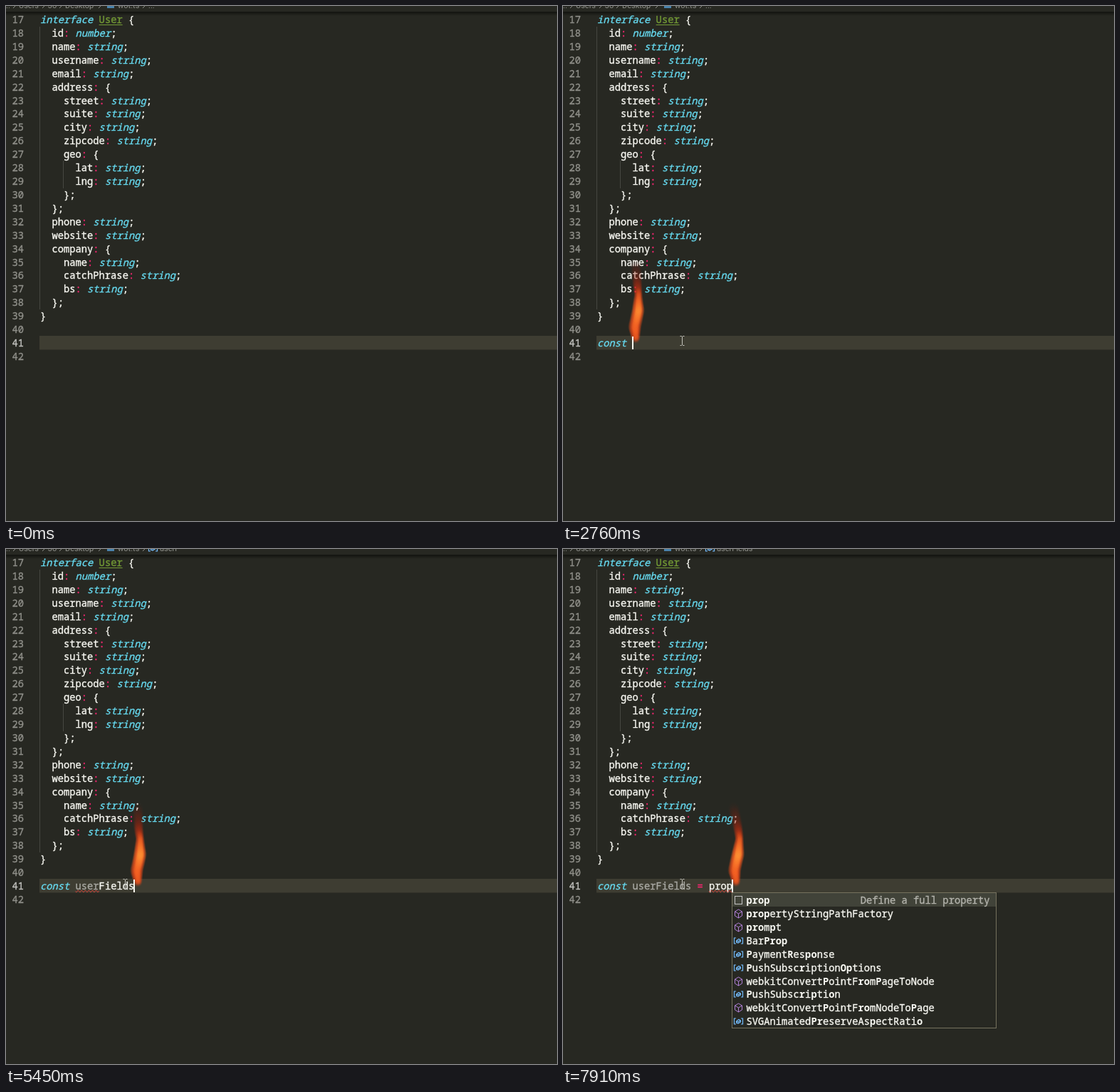
An HTML page with a canvas for the animation above (7.99 s loop, 774 by 723 pixels).

```html
<!DOCTYPE html>
<html lang="en">
<head>
<meta charset="utf-8">
<title>Typing with flames</title>
<style>
html, body { margin: 0; width: 100%; height: 100%; overflow: hidden; background: #272822; }
canvas { display: block; }
</style>
</head>
<body>
<canvas id="stage" width="774" height="723"></canvas>
<script>
const ctx = document.getElementById('stage').getContext('2d');
const LOOP = 7990, CW = 8.262, LH = 18.92, LEFT = 48, ROW = 473;
const MONO = '"Noto Sans Mono", "DejaVu Sans Mono", monospace';
const WHITE = '#f8f8f2', BLUE = '#66d9ef', PINK = '#f92672', DIM = '#a9a9a3';

const CODE = `interface User {
  id: number;
  name: string;
  username: string;
  email: string;
  address: {
    street: string;
    suite: string;
    city: string;
    zipcode: string;
    geo: {
      lat: string;
      lng: string;
    };
  };
  phone: string;
  website: string;
  company: {
    name: string;
    catchPhrase: string;
    bs: string;
  };
}`.split('\n');

const TYPED = 'const userFields = prop';
const KEYS = [1680, 1760, 1850, 1960, 2380, 2600, 3100, 3280, 3500, 3900, 4600, 4960,
  5060, 5130, 5190, 5260, 5880, 5940, 6000, 6830, 7060, 7220, 7500];
const BURN = 600;

// Breadcrumb symbol by time; empty means an ellipsis
const CRUMBS = [[0, ''], [3260, 'u'], [3460, 'us'], [3750, 'use'], [4300, 'user'],
  [5300, 'userF'], [5700, 'userFields'], [6300, ''], [7680, 'userFields']];

// First letter picks the icon, stars switch the matched letters on and off
const POPUPS = [
  { from: 1990, to: 2380, col: 4, scroll: true, items: ['v*cons*ole', 'k*cons*t', 'v*Cons*tantSourceNode',
    'v*Co*u*n*tQueuing*S*trategy', 'vms*Con*tent*S*cript', 'v*Co*mpo*s*itio*n*Event', 'v*C*l*os*eEve*n*t',
    'vHTMLForm*Con*trol*s*Collection', 'v*C*aretP*os*itio*n*', 'v*c*ust*o*mEleme*n*t*s*',
    'vDynamics*Co*mpre*s*sor*N*ode', 'v*C*ust*o*mEleme*n*tRegi*s*try'] },
  { from: 2420, to: 2600, col: 5, items: ['k*const*', 'v*Const*antSourceNode', 'v*Co*u*n*tQueuing*St*rategy',
    'vms*Con*tent*S*crip*t*', 'vHTMLForm*Con*trol*s*Collec*t*ion', 'v*C*ust*o*mEleme*n*tRegi*st*ry',
    'vOver*const*rainedError', 'vCustomElement*Const*ructor', 'vMediaStream*Const*raints', 'vAudio*Con*text*St*ate'] },
  { from: 4000, to: 4600, col: 10, items: ['a*user*name', 'a*User*'] },
  { from: 7540, to: LOOP, col: 23, note: 'Define a full property', items: ['s*prop*', 'm*prop*ertyStringPathFactory',
    'm*pro*m*p*t', 'vBar*Prop*', 'v*P*ayment*R*es*po*nse', 'v*P*ushSubsc*r*iption*Op*tions',
    'mwebkitConvert*P*ointF*ro*m*P*ageToNode', 'v*P*ushSubsc*r*i*p*ti*o*n',
    'mwebkitConvert*P*ointF*ro*mNodeTo*P*age', 'vSVGAnimated*Pr*eserveAs*p*ectRati*o*'] }
];

// Flame spine, bottom to top: height, sideways shift, radius, heat
const SPARK = [[1, 1, 3, .5], [5, 2, 5, .7], [9, 3, 6, .9], [13, 4, 6, 1], [17, 4, 5, .8], [20, 4, 3, .4]];
const RISING = [[11, 1, 5, .65], [30, 2, 9, .75], [60, 11, 7, .8], [84, 9, 4, .45], [100, 6, 7, .14], [117, 5, 8, .03]];
const FULL = [[5, 5, 6, .75], [22, 3, 9, .8], [44, 8, 9, 1], [66, 9, 6, .8], [86, 6, 7, .35], [110, 3, 8, .06]];

const mix = (a, b, k) => a + (b - a) * k;
const clamp = k => Math.max(0, Math.min(1, k));
const mixRow = (a, b, k) => a.map((v, i) => mix(v, b[i], k));
const textWidth = s => s.length * CW;

function rect(x, y, w, h, color) {
  ctx.fillStyle = color;
  ctx.fillRect(x, y, w, h);
}

// A hairline outline gives the regular weight a medium look
function put(s, x, y, color = WHITE, style = '') {
  ctx.font = `${style} ${CW / .6}px ${MONO}`;
  ctx.fillStyle = ctx.strokeStyle = color;
  ctx.lineWidth = .35;
  ctx.fillText(s, x, y + 5);
  if (style !== 'bold') ctx.strokeText(s, x, y + 5);
  return x + textWidth(s);
}

function stroke(color, width, ...lines) {
  ctx.strokeStyle = color;
  ctx.lineWidth = width;
  ctx.beginPath();
  for (const line of lines)
    line.forEach(([x, y], i) => i ? ctx.lineTo(x, y) : ctx.moveTo(x, y));
  ctx.stroke();
}

function squiggle(x, w) {
  const wave = [];
  for (let d = 0; d <= w; d += .5) wave.push([x + d, 480.5 + 1.3 * Math.sin(d * 1.25)]);
  stroke('#e5483f', 1, wave);
}

function drawCode() {
  for (let i = 0; i < 26; i++) {
    const n = String(17 + i);
    put(n, 25 - textWidth(n), 19 + i * LH, i === 24 ? '#c2c2bf' : '#90908a');
  }
  rect(47, 29, 1, 397, '#464741');
  rect(80, 217, 1, 39, '#464741');
  CODE.forEach((line, i) => {
    const y = 19 + i * LH;
    let x = LEFT;
    for (const part of line.split(/(interface|User|string|number|:)/)) {
      if (part === ':') x = put(part, x, y, PINK);
      else if (part === 'User') {
        rect(x, y + 7, textWidth(part), 1, '#739a35');
        x = put(part, x, y, '#739a35');
      } else if (/^(interface|string|number)$/.test(part)) x = put(part, x, y, BLUE, 'italic');
      else x = put(part, x, y);
    }
  });
}

function drawCrumbs(t) {
  const label = (s, x) => {
    ctx.font = '11px Roboto, "Open Sans", sans-serif';
    ctx.fillStyle = '#8f908b';
    ctx.fillText(s, x, 3);
  };
  label('..', 0);
  label('Users', 18);
  label('Jo', 59);
  label('Desktop', 83);
  label('wot.ts', 157);
  for (const x of [10, 51, 75, 130, 192]) stroke('#8f908b', 1, [[x, -5], [x + 4, -1], [x, 3]]);
  rect(142, -6, 10, 9, '#4a83ad');
  const symbol = CRUMBS.filter(c => c[0] <= t).pop()[1];
  if (symbol) icon('v', 200, -1);
  label(symbol || '...', symbol ? 216 : 200);
  const shade = ctx.createLinearGradient(0, 8, 0, 14);
  shade.addColorStop(0, 'rgba(0,0,0,.55)');
  shade.addColorStop(1, 'rgba(0,0,0,0)');
  rect(0, 8, 774, 6, shade);
}

function icon(kind, x, y) {
  if (kind === 'v') {
    stroke('#75beff', 1.2, [[x + 3, y - 4], [x + .5, y - 4], [x + .5, y + 4], [x + 3, y + 4]],
      [[x + 10, y - 4], [x + 12.5, y - 4], [x + 12.5, y + 4], [x + 10, y + 4]],
      [[x + 3.5, y], [x + 7, y - 2.5], [x + 9.5, y - 1], [x + 9.5, y + 1], [x + 6, y + 3], [x + 3.5, y + 2], [x + 3.5, y]],
      [[x + 3.5, y], [x + 6, y + 1], [x + 9.5, y - 1]]);
  } else if (kind === 'm') {
    stroke('#b180d7', 1, [[x + 6.5, y - 6], [x + 11.5, y - 3], [x + 11.5, y + 3], [x + 6.5, y + 6],
      [x + 1.5, y + 3], [x + 1.5, y - 3], [x + 6.5, y - 6]],
      [[x + 1.5, y - 3], [x + 6.5, y], [x + 11.5, y - 3]], [[x + 6.5, y], [x + 6.5, y + 6]]);
  } else if (kind === 'k') {
    for (let i = 0; i < 4; i++) {
      rect(x + 1, y - 5 + i * 3, i % 2 ? 4 : 7, 1, '#c5c5c5');
      rect(x + (i % 2 ? 6 : 9), y - 5 + i * 3, i % 2 ? 6 : 3, 1, '#c5c5c5');
    }
  } else if (kind === 's') {
    ctx.strokeStyle = '#c5c5c5';
    ctx.lineWidth = 1;
    ctx.strokeRect(x + 1.5, y - 5.5, 10, 11);
  } else {
    ctx.font = 'bold 8.5px "Open Sans", sans-serif';
    ctx.fillStyle = '#b5b5b0';
    ctx.fillText('abc', x - .5, y + 2.5);
  }
}

function drawPopup({ col, items, note, scroll }) {
  const x = Math.round(LEFT + col * CW) - 1, h = items.length * LH + 2;
  rect(x, 482, 372, Math.round(h), '#75715e');
  rect(x + 1, 483, 370, Math.round(h) - 2, '#272822');
  rect(x + 1, 483, 370, 19, '#414339');
  if (scroll) rect(x + 362, 483, 9, 213, '#50514c');
  items.forEach((item, i) => {
    const y = 493 + i * LH;
    icon(item[0], x + 3, Math.round(y));
    let tx = x + 20.5;
    item.slice(1).split('*').forEach((s, j) => { tx = put(s, tx, y, WHITE, j % 2 ? 'bold' : ''); });
  });
  if (note) put(note, x + 362.5 - textWidth(note), 493, '#b4b4ad');
}

function puff(x, y, r, heat, alpha) {
  const rgb = `${mix(130, 255, clamp(heat * 1.25))},${mix(28, 150, heat * heat)},${mix(10, 52, heat * heat)}`;
  const g = ctx.createRadialGradient(x, y, 0, x, y, r);
  g.addColorStop(0, `rgba(${rgb},${alpha})`);
  g.addColorStop(.6, `rgba(${rgb},${alpha * .75})`);
  g.addColorStop(1, `rgba(${rgb},0)`);
  ctx.fillStyle = g;
  ctx.fillRect(x - r, y - r, 2 * r, 2 * r);
}

function drawFlame(x, age) {
  const rise = clamp((age - 35) / 40), fill = clamp((age - 90) / 80);
  const pose = SPARK.map((p, i) => mixRow(mixRow(p, RISING[i], rise), FULL[i], fill));
  const steps = 45;
  for (const core of [false, true]) {
    for (let i = 0; i <= steps; i++) {
      const u = i / steps * 4.999, k = Math.floor(u);
      const [up, dx, r, heat] = mixRow(pose[k], pose[k + 1], u - k);
      const sway = fill * u * .3 * Math.sin(age / 60 - up / 14);
      if (!core) puff(x + dx + sway, ROW - up, r * 1.1, heat * .75, heat * .5);
      else if (heat > .6) puff(x + dx + sway + .5, ROW - up, r * .65, heat, (heat - .5) * 1.1);
    }
  }
}

function drawTyped(t, count) {
  const shown = TYPED.slice(0, count), at = n => LEFT + n * CW;
  const span = (a, b, color, style) => put(shown.slice(a, b), at(a), ROW, color, style);
  const resolved = t >= 7450, flagged = t >= 4050;
  span(0, 5, count > 4 ? BLUE : WHITE, count > 4 ? 'italic' : '');
  span(6, 10, flagged ? DIM : WHITE);
  span(10, 16, resolved ? DIM : WHITE);
  span(17, 18, PINK);
  span(19, 23);
  if (resolved) squiggle(at(19), 4 * CW);
  else if (flagged) squiggle(at(6), 4 * CW);
}

function drawPointer(t) {
  const k = 1 - (1 - clamp((t - 70) / 610)) ** 2;
  const nudge = t >= 840 && t < 910 ? 1 : 0;
  const x = Math.round(mix(497, 167, k)) + nudge * 4 + .5, y = Math.round(mix(657, 470, k)) - nudge * 3;
  stroke('#c4c4bd', 1, [[x, y - 6], [x, y + 6]],
    [[x - 3, y - 6.5], [x - 1, y - 6.5], [x, y - 5.5], [x + 1, y - 6.5], [x + 3, y - 6.5]],
    [[x - 3, y + 6.5], [x - 1, y + 6.5], [x, y + 5.5], [x + 1, y + 6.5], [x + 3, y + 6.5]]);
}

function draw(t) {
  const count = KEYS.filter(k => k <= t).length;
  const caret = LEFT + count * CW;
  rect(0, 0, 774, 723, '#272822');
  rect(47, 463, 727, 19.5, '#3e3d32');
  drawCode();
  drawCrumbs(t);
  drawTyped(t, count);
  const age = count ? t - KEYS[count - 1] : BURN;
  if (age < BURN) drawFlame(caret, age);
  if (count || (t >= 850 && t < 1390)) rect(Math.round(caret) - 1, 464, 2, 18, '#f8f8f0');
  const popup = POPUPS.find(p => t >= p.from && t < p.to);
  if (popup) drawPopup(popup);
  if (t >= 70) drawPointer(t);
}

const start = performance.now();
function tick() {
  draw((performance.now() - start) % LOOP);
  requestAnimationFrame(tick);
}
tick();
</script>
</body>
</html>
```
